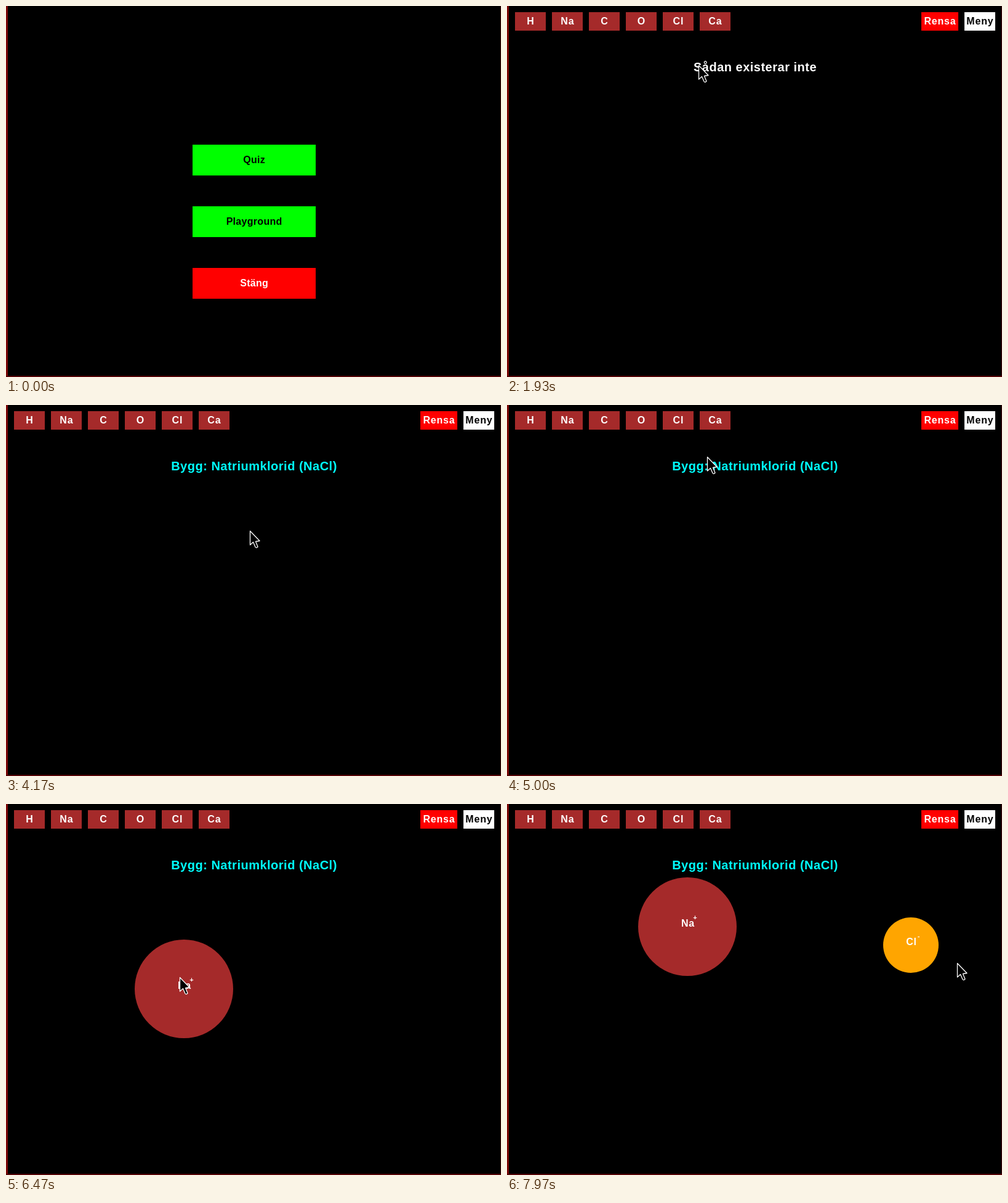
Recreate the animation shown at these times as an HTML page with a canvas. Size 804 by 602 pixels, loop 8 s.

```html
<!DOCTYPE html>
<html lang="sv">
<head>
<meta charset="utf-8">
<style>
  html, body { margin: 0; width: 100%; height: 100%; overflow: hidden; background: #000; }
  canvas { display: block; }
</style>
</head>
<body>
<canvas id="stage" width="804" height="602"></canvas>
<script>
const ctx = document.getElementById('stage').getContext('2d');
const LOOP = 8000;
const BROWN = '#a52a2a';

// Screen changes and spawn times in ms
const CURSOR_IN = 1000, PLAY = 1565, MENU = 3295, QUIZ = 3865;
const NA_SPAWN = 5865, DRAG = 6200, DROP = 6900, CL_SPAWN = 7365;

const START = { x: 478, y: 288 };
const GRAB = { x: 7, y: 19 };
const NA_HOME = { x: 287, y: 365 };

// Each move eases the cursor to a point between two times
const move = (from, to, x, y) => ({ from, to, x, y });
const moves = [
  move(960, 1520, 438, 359),
  move(1740, 1930, 311, 96),
  move(2200, 2266, 331, 101),
  move(2400, 2830, 769, 40),
  move(3070, 3200, 755, 31),
  move(3390, 3930, 432, 246),
  move(4020, 4400, 324, 118),
  move(4540, 4800, 391, 104),
  move(4800, 5370, 156, 35),
  move(5370, 5700, 77, 20),
  move(5860, 6170, 280, 346),
  move(6240, 6770, 286, 180),
  move(7020, 7320, 262, 21),
  move(7365, 7830, 783, 310),
  move(7840, 7966, 731, 258)
];

const smooth = u => u * u * (3 - 2 * u);

function cursorAt(t) {
  let { x, y } = START;
  for (const m of moves) {
    if (t <= m.from) break;
    const e = smooth(Math.min((t - m.from) / (m.to - m.from), 1));
    x += (m.x - x) * e;
    y += (m.y - y) * e;
  }
  return { x: Math.round(x), y: Math.round(y) };
}

function rect(x, y, w, h, color) {
  ctx.fillStyle = color;
  ctx.fillRect(x, y, w, h);
}

function label(text, x, y, color, size = 16, spacing = 0) {
  ctx.font = `bold ${size}px "Liberation Sans", Arial, sans-serif`;
  ctx.letterSpacing = spacing + 'px';
  ctx.textAlign = 'center';
  ctx.fillStyle = color;
  ctx.fillText(text, x, y);
}

function button(text, x, y, w, h, color, ink, spacing) {
  rect(x, y, w, h, color);
  label(text, x + w / 2 + spacing / 2, y + h / 2 + 5, ink, 16, spacing);
}

function atom(symbol, charge, x, y, r, color) {
  ctx.beginPath();
  ctx.arc(x, y, r, 0, Math.PI * 2);
  ctx.fillStyle = color;
  ctx.fill();
  label(symbol, x + 1, y, '#fff', 16, 0.8);
  label(charge, x + 12.5, y - 11, '#fff', 11);
}

function drawMenu() {
  button('Quiz', 303, 225, 200, 50, '#0f0', '#000', 0.3);
  button('Playground', 303, 325, 200, 50, '#0f0', '#000', 0.3);
  button('Stäng', 303, 425, 200, 50, '#f00', '#fff', 0.3);
}

function drawLab(title, color) {
  ['H', 'Na', 'C', 'O', 'Cl', 'Ca'].forEach((name, i) =>
    button(name, 13 + i * 60, 10, 50, 30, BROWN, '#fff', 0.8));
  button('Rensa', 673, 10, 60, 30, '#f00', '#fff', 0.8);
  button('Meny', 743, 10, 50, 30, '#fff', '#000', 0.8);
  label(title, 403, 106, color, 20, 0.5);
}

function drawCursor({ x, y }) {
  ctx.save();
  ctx.translate(x + 0.5, y + 0.5);
  ctx.beginPath();
  ctx.moveTo(0, 0);
  ctx.lineTo(0, 22.5);
  ctx.lineTo(5, 18);
  ctx.lineTo(8.5, 26);
  ctx.quadraticCurveTo(10, 28.5, 12.5, 25.5);
  ctx.lineTo(9, 17);
  ctx.lineTo(15.5, 16);
  ctx.closePath();
  ctx.fillStyle = '#000';
  ctx.fill();
  ctx.strokeStyle = '#fff';
  ctx.lineWidth = 1.3;
  ctx.lineJoin = 'round';
  ctx.stroke();
  ctx.restore();
}

function drawBackdrop() {
  rect(0, 0, 804, 602, '#000');
  rect(0, 0, 3, 602, '#7c0808');
  rect(0, 600, 804, 2, '#540508');
  rect(803, 0, 1, 600, '#400808');
}

function draw(t) {
  drawBackdrop();
  if (t < PLAY || (t >= MENU && t < QUIZ)) drawMenu();
  else if (t < MENU) drawLab('Sådan existerar inte', '#fff');
  else drawLab('Bygg: Natriumklorid (NaCl)', '#0ff');

  if (t >= NA_SPAWN) {
    const grip = cursorAt(Math.min(t, DROP));
    const na = t < DRAG ? NA_HOME : { x: grip.x + GRAB.x, y: grip.y + GRAB.y };
    atom('Na', '+', na.x, na.y, 80, BROWN);
  }
  if (t >= CL_SPAWN) atom('Cl', '-', 656, 229, 45, '#ffa500');
  if (t >= CURSOR_IN) drawCursor(cursorAt(t));
}

// Motion advances in 30 steps per second
function frame() {
  const ms = performance.now() % LOOP;
  draw(Math.floor(ms * 0.03 + 0.15) / 0.03 + 0.01);
  requestAnimationFrame(frame);
}
frame();
</script>
</body>
</html>
```
